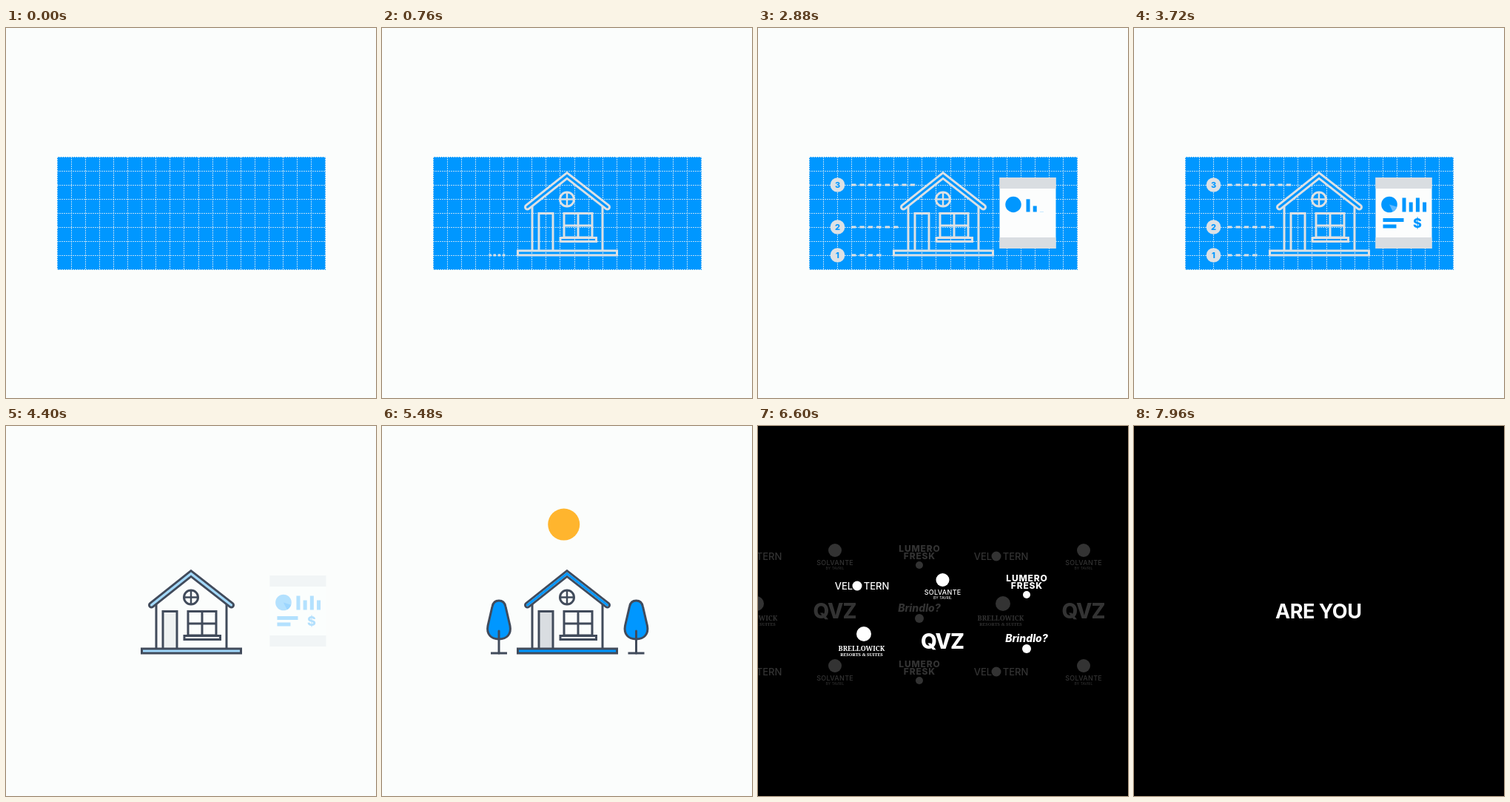
An HTML page with a canvas that plays this animation: 500 by 500 pixels, repeating every 8000 ms.

```html
<!DOCTYPE html>
<html lang="en">
<head>
<meta charset="utf-8">
<title>House plan</title>
<style>
html, body { margin: 0; width: 100%; height: 100%; overflow: hidden; background: #fbfdfc; }
canvas { display: block; width: 100vw; height: 100vh; }
</style>
</head>
<body>
<canvas id="stage" width="500" height="500"></canvas>
<script>
const c = document.getElementById('stage').getContext('2d');
const LOOP = 8000, BLUE = '#0097ff', PAPER = '#fbfdfc', PALE = '#dde1e4', DARK = '#414b5b', GREY = '#d9dde1';
const TAU = Math.PI * 2;

const seg = (t, a, b) => Math.min(1, Math.max(0, (t - a) / (b - a)));
const smooth = (t, a, b) => { const x = seg(t, a, b); return x * x * (3 - 2 * x); };
const settle = (t, a, b) => 1 - (1 - seg(t, a, b)) ** 3;

function group(draw, alpha = 1) {
  if (alpha <= 0) return;
  c.save();
  c.globalAlpha *= alpha;
  draw();
  c.restore();
}
function box(x, y, w, h, color) {
  c.fillStyle = color;
  c.fillRect(x, y, w, h);
}
function disc(x, y, r, color) {
  c.fillStyle = color;
  c.beginPath();
  c.arc(x, y, Math.max(0, r), 0, TAU);
  c.fill();
}
function text(s, x, y, font, color = '#fff', spacing = 0) {
  c.font = font;
  c.fillStyle = color;
  c.textAlign = 'center';
  c.letterSpacing = spacing + 'px';
  c.fillText(s, x + spacing / 2, y);
}

// Polyline drawn up to the fraction p of its length
function line(pts, p, color, width = 3, cap = 'butt') {
  if (p <= 0) return;
  let len = 0;
  c.beginPath();
  pts.forEach(([x, y], i) => {
    if (i) len += Math.hypot(x - pts[i - 1][0], y - pts[i - 1][1]);
    c.lineTo(x, y);
  });
  c.strokeStyle = color;
  c.lineWidth = width;
  c.lineCap = cap;
  c.setLineDash(p < 1 ? [len * p, len * 2] : []);
  c.stroke();
  c.setLineDash([]);
}
const frame = (x, y, x2, y2, p, color) =>
  line([[x, y], [x2, y], [x2, y2], [x, y2], [x, y]], p, color, 3, 'square');

// paint: how far the colours are filled in; p(k): progress of part k
function house(color, paint, p) {
  const roof = [[196.5, 242], [250, 199.5], [304.5, 242]];
  group(() => {
    box(183, 301, 135, 6, BLUE);
    box(212, 250, 19, 50, GREY);
  }, paint);
  frame(183.5, 301, 317.5, 307, p(0), color);
  line([[203, 300], [203, 239]], p(1), color);
  line([[298, 300], [298, 239]], p(1), color);
  line([[212, 300], [212, 250.5], [231, 250.5], [231, 300]], p(2), color);
  line(roof, p(3), color, 9, 'round');
  if (color === DARK) line(roof, 1, PAPER, 3, 'round');
  group(() => line(roof, p(3), BLUE, 3, 'round'), color === DARK ? paint : 1);
  frame(246, 250.5, 284, 283, p(4), color);
  line([[265, 250], [265, 283]], p(5), color);
  line([[246, 267], [284, 267]], p(5), color);
  frame(241, 283.5, 289.5, 288.5, p(4), color);
  if (p(5) > 0) {
    c.beginPath();
    c.arc(250, 231.5, 9.5, -TAU / 4, -TAU / 4 + TAU * p(5));
    c.lineWidth = 3;
    c.lineCap = 'butt';
    c.stroke();
    line([[250, 222], [250, 241]], p(5), color, 2.5);
    line([[240.5, 231.5], [259.5, 231.5]], p(5), color, 2.5);
  }
}

function label(t, n, y, dashes, start) {
  const s = smooth(t, start, start + 200);
  const end = 120.5 + dashes * 11.4;
  for (let i = 0; i < dashes && s > 0; i++)
    box(end - (end - 126 - i * 11.4) * s, y - 1.5, 6.4 * s, 3, PALE);
  const pop = settle(t, start + 160, start + 360);
  disc(107.5, y, 9.8 * pop, PALE);
  group(() => text(n, 107.5, y + 4, '800 11px Inter, sans-serif', BLUE), pop);
}

function blueprint(t) {
  const edge = 69 + 363 * (1 - smooth(t, 3740, 4040));
  group(() => {
    c.beginPath();
    c.rect(69, 174, edge - 69, 153);
    c.clip();
    box(69, 174, 363, 153, BLUE);
    c.strokeStyle = 'rgba(225,238,244,.8)';
    c.lineWidth = 1;
    c.lineCap = 'butt';
    c.setLineDash([2, 1]);
    c.beginPath();
    for (let i = 0; i < 20; i++) {
      const x = Math.round(69 + i * 19.05) + .5;
      c.moveTo(x, 174);
      c.lineTo(x, 327);
    }
    for (let i = 0; i < 9; i++) {
      c.moveTo(69, 174.5 + i * 19);
      c.lineTo(432, 174.5 + i * 19);
    }
    c.stroke();
    c.setLineDash([]);
    house(PALE, 0, k => smooth(t, 20 + k * 60, 380 + k * 60));
    label(t, '1', 307, 4, 655);
    label(t, '2', 269, 6, 1080);
    label(t, '3', 212, 8, 1480);
  });
  if (t > 3740) group(() => {
    const f = smooth(t, 4020, 4200);
    const w = 14 * smooth(t, 3740, 3840);
    c.translate(edge - (edge - 57) * f, 250.5 + 93 * f);
    c.rotate(f * TAU / 8);
    box(-w / 2, -76.5, w, 153, BLUE);
    box(-w / 2, -76.5, w / 4, 153, PALE);
  }, 1 - seg(t, 4130, 4210));
}

function report(t) {
  const wide = settle(t, 2000, 2220);
  if (!wide) return;
  const open = smooth(t, 2240, 2800);
  const half = .5 + 47.5 * open;
  const roll = Math.min(15, half);
  const slide = smooth(t, 4220, 4500);
  group(() => {
    c.translate(42 * slide, 0);
    c.beginPath();
    c.rect(326.5, 250 - half, 76 * wide, half * 2);
    c.clip();
    box(326, 202, 77, 96, '#fcfdfd');
    const pie = settle(t, 2640, 2940);
    disc(345, 238.5, 10.8 * pie, BLUE);
    if (pie === 1) {
      c.beginPath();
      c.moveTo(345, 238.5);
      c.arc(345, 238.5, 10.8, .3, 1.1);
      c.closePath();
      c.fillStyle = '#62baff';
      c.fill();
    }
    [19, 13, 19, 13].forEach((h, i) => {
      const g = h * settle(t, 2740 + i * 70, 3000 + i * 70);
      box(362.5 + i * 9.2, 248.5 - g, 5, g, BLUE);
    });
    box(336.5, 257, 28 * settle(t, 2900, 3120), 5, BLUE);
    box(336.5, 265.5, 18 * settle(t, 3000, 3220), 5, BLUE);
    group(() => text('$', 383, 270, '800 18px Inter, sans-serif', BLUE), settle(t, 3080, 3300));
    box(326, 250 - half, 77, roll, GREY);
    box(326, 250 + half - roll, 77, roll, GREY);
  }, 1 - slide);
}

function tree(x, grow) {
  group(() => {
    c.translate(x, 307);
    c.scale(grow, grow);
    c.beginPath();
    c.moveTo(0, -71);
    c.bezierCurveTo(5, -71, 8, -68, 9, -63);
    c.lineTo(15, -37);
    c.bezierCurveTo(17, -26, 11, -19, 0, -19);
    c.bezierCurveTo(-11, -19, -17, -26, -15, -37);
    c.lineTo(-9, -63);
    c.bezierCurveTo(-8, -68, -5, -71, 0, -71);
    c.closePath();
    c.fillStyle = BLUE;
    c.fill();
    c.strokeStyle = DARK;
    c.lineWidth = 3;
    c.stroke();
    line([[0, -30], [0, 0]], 1, DARK, 3, 'round');
    line([[-11, 0], [11, 0]], 1, DARK);
  }, grow ? 1 : 0);
}

function dayScene(t) {
  const a = seg(t, 5085, 5885) * Math.PI;
  disc(250 - 272 * Math.cos(a), 330 - 197 * Math.sin(a), 21.5, '#ffb52e');
  if (t > 3700) house(DARK, smooth(t, 4240, 4640), () => 1);
  if (t < 4220) blueprint(t);
  report(t);
  tree(158, settle(t, 4440, 4800));
  tree(343.5, settle(t, 4600, 4960));
}

const sans = 'Inter, sans-serif', serif = '"Noto Serif", serif';
const partners = [
  (x, y) => {
    text('VEL', x - 24, y + 5, '500 13px ' + sans);
    disc(x - 6, y, 6.5, '#fff');
    text('TERN', x + 20, y + 5, '500 13px ' + sans);
  },
  (x, y) => {
    disc(x, y - 8, 9, '#fff');
    text('SOLVANTE', x, y + 12, '500 9px ' + sans, '#fff', .3);
    text('BY TAVRIL', x, y + 18, '5px ' + sans);
  },
  (x, y) => {
    text('LUMERO', x, y - 6, '800 12px ' + sans, '#fff', .8);
    text('FRESK', x, y + 4, '800 12px ' + sans, '#fff', .8);
    disc(x, y + 12, 5, '#fff');
  },
  (x, y) => {
    disc(x + 3, y - 10, 10, '#fff');
    text('BRELLOWICK', x, y + 13, '700 9px ' + serif);
    text('RESORTS & SUITES', x, y + 20, '700 6px ' + serif);
  },
  (x, y) => text('QVZ', x, y + 10, '800 28px ' + sans, '#fff', -1),
  (x, y) => {
    text('Brindlo?', x, y + 1, 'italic 800 14px ' + sans);
    disc(x, y + 10, 6, '#fff');
  }
];

function partnerScene(t) {
  group(() => {
    group(() => {
      c.translate(32 * (1 - settle(t, 5900, 6560)), 0);
      [176, 250, 332].forEach((y, row) =>
        [-5, 104, 218, 328, 440].forEach((x, i) => partners[i % 3 + (row === 1 ? 3 : 0)](x, y)));
    }, .2 * seg(t, 5900, 6400));
    partners.forEach((draw, i) =>
      group(() => draw([140, 249.5, 363][i % 3], i < 3 ? 216 : 291), smooth(t, 5920 + i * 70, 6220 + i * 70)));
  }, 1 - smooth(t, 7030, 7640));
  group(() => text('ARE YOU', 249.5, 260, '700 27px ' + sans, '#fff', -.5), seg(t, 7720, 7940));
}

function render(now) {
  const t = now % LOOP;
  box(0, 0, 500, 500, PAPER);
  if (t < 5880) dayScene(t);
  group(() => box(0, 0, 500, 500, '#000'), smooth(t, 5640, 5870));
  if (t > 5880) partnerScene(t);
}

const start = performance.now();
function tick() {
  render(performance.now() - start);
  requestAnimationFrame(tick);
}
tick();
</script>
</body>
</html>
```
